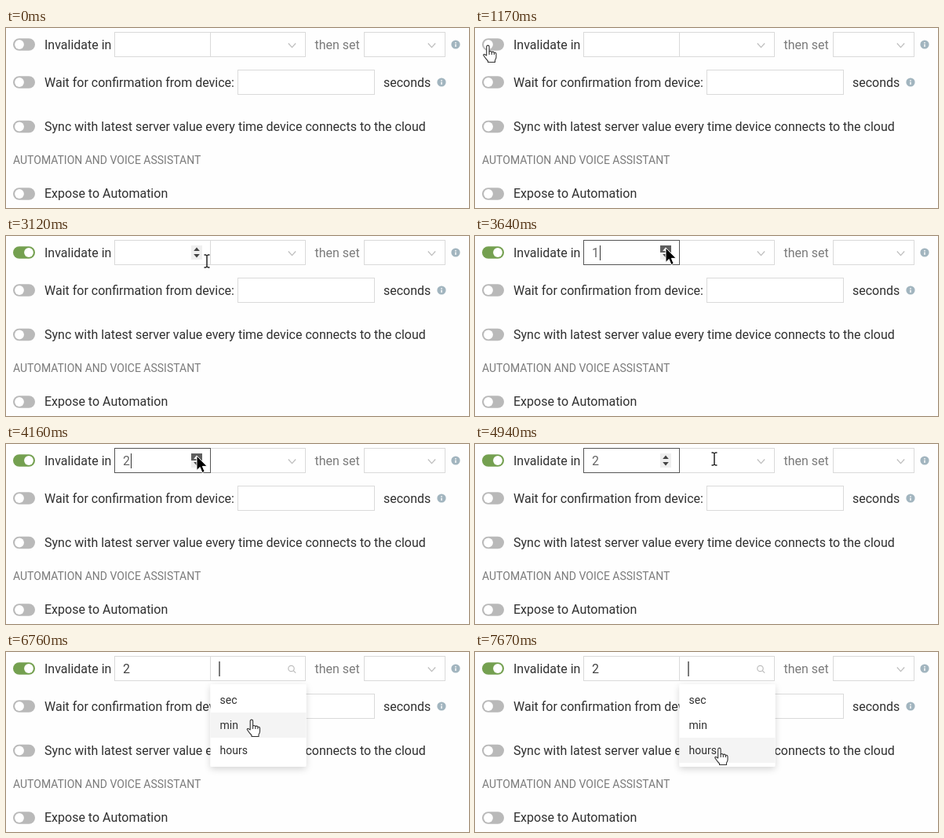
Animation, 590 px wide and 229 px high, one loop 8 s. Source, as an HTML page:

```html
<!DOCTYPE html>
<html lang="en">
<head>
<meta charset="utf-8">
<style>
html, body { margin: 0; width: 100%; height: 100%; overflow: hidden; background: #fefefe; }
svg { display: block; }
text { font: 16px Roboto, Arial, sans-serif; fill: #303030; }
.gray { fill: #7b7b7b; }
.small { font-size: 14px; }
.box { fill: #fff; stroke: #dadada; }
.line { fill: none; stroke: #bdbdbd; stroke-width: 1.2; }
</style>
</head>
<body>
<svg width="590" height="229" viewBox="0 0 590 229">
  <defs>
    <g id="info">
      <circle r="5.6" fill="#a2b5bf"/>
      <path d="M0-3v1.4M0-.6V3" stroke="#fff" stroke-width="1.4"/>
    </g>
    <path id="chevron" class="line" d="M-4.7-2.5L0 2.7L4.7-2.5"/>
    <filter id="shadow" x="-20%" y="-20%" width="140%" height="150%">
      <feDropShadow dx="0" dy="3" stdDeviation="4" flood-opacity=".16"/>
    </filter>
  </defs>

  <g id="toggles"></g>

  <text x="49" y="26.5">Invalidate in</text>
  <text x="49" y="74.5">Wait for confirmation from device:</text>
  <text x="49" y="130.5">Sync with latest server value every time device connects to the cloud</text>
  <text x="9" y="173" class="gray small">AUTOMATION AND VOICE ASSISTANT</text>
  <text x="49" y="216">Expose to Automation</text>
  <text x="393.5" y="26.5" class="gray">then set</text>
  <text x="481" y="74.5">seconds</text>

  <rect class="box" x="260.5" y="5.5" width="121" height="31"/>
  <rect class="box" x="456.5" y="5.5" width="103" height="31"/>
  <rect class="box" x="295.5" y="53.5" width="174" height="31"/>
  <rect class="box" id="field" x="138.5" y="5.5" width="122" height="31"/>
  <text id="value" x="149" y="27"></text>
  <path id="fieldCaret" d="M159.5 12V31" stroke="#333"/>

  <g id="spinner">
    <rect x="236" y="12" width="14" height="18" fill="#efefef"/>
    <rect id="upButton" x="236" y="12" width="14" height="9" fill="#5f5f5f"/>
    <path id="upMark" d="M239.2 19l3.8-4.5 3.8 4.5z"/>
    <path d="M239.2 23l3.8 4.5 3.8-4.5z" fill="#444"/>
  </g>

  <use id="selectMark" href="#chevron" x="364.5" y="22"/>
  <g id="search" class="line"><circle cx="363.5" cy="21" r="3.7"/><path d="M366.2 23.7l3 3"/></g>
  <path id="selectCaret" d="M272 12V31" stroke="#333" stroke-width="1.3"/>
  <use href="#chevron" x="542.5" y="22"/>
  <use href="#info" x="573" y="21"/>
  <use href="#info" x="555" y="69"/>

  <g id="menu">
    <rect x="260.5" y="41" width="122" height="105" rx="2" fill="#fff" filter="url(#shadow)"/>
    <rect id="active" x="260.5" width="122" height="32" fill="#f4f4f4"/>
    <text class="small" x="272.5" y="66">sec</text>
    <text class="small" x="272.5" y="98">min</text>
    <text class="small" x="272.5" y="130">hours</text>
  </g>

  <g id="pointer" stroke-linejoin="round">
    <g id="hand" fill="#fff" stroke="#333" stroke-width="1.1">
      <path d="M-1.8 13V1.8a1.7 1.7 0 0 1 3.4 0V8q1.8-1.3 3.2.6q1.7-1.1 3.1.7q2.3-.5 2.6 1.7V15q0 2-1.5 4V21.5H0V20Q-3 17-5.8 12.5q.6-2.4 4 .5z"/>
      <path d="M1.6 8v4M4.8 8.6V12M7.9 9.3V12" fill="none"/>
    </g>
    <path id="beam" d="M-3.5-8H-1.5L0-7L1.5-8H3.5M0-7V7M-3.5 8H-1.5L0 7L1.5 8H3.5" fill="none" stroke="#222" stroke-width="1.5"/>
    <path id="arrow" d="M0 0V18.5L4.2 14.6L7 21.5L10.2 20.2L7.4 13.4H13.2z" stroke="#fff"/>
  </g>
</svg>
<script>
const $ = id => document.getElementById(id);
const show = (id, on) => $(id).style.display = on ? '' : 'none';
const clamp = v => Math.min(1, Math.max(0, v));
const ease = v => v * v * (3 - 2 * v);

const LOOP = 8000, STEP = 130;
const ENTER = 650, TOGGLE = 1690, FOCUS = 3640, SECOND = 4030, OPEN = 5460;

// Pointer stops: time, x, y
const path = [
  [520, 95, 235], [1170, 16.5, 22], [1820, 16.5, 22], [3120, 256, 32],
  [3510, 243, 15], [4550, 243, 15], [5330, 367, 23], [5980, 367, 23],
  [6760, 313, 86], [6890, 313, 86], [7670, 311.5, 122], [8000, 311.5, 122]
];

$('toggles').innerHTML = [21, 69, 125.5, 211].map(y =>
  `<rect x="9" y="${y - 7.75}" width="28" height="15.5" rx="7.75" fill="#b9b9b9"/>
   <circle cx="17" cy="${y}" r="5.9" fill="#fff"/>`).join('');
const [track, knob] = $('toggles').children;

function position(t) {
  const i = Math.max(1, path.findIndex(p => p[0] > t));
  const [t0, x0, y0] = path[i - 1], [t1, x1, y1] = path[i];
  const k = ease(clamp((t - t0) / (t1 - t0)));
  return [x0 + (x1 - x0) * k, y0 + (y1 - y0) * k];
}

function draw(t) {
  const [x, y] = position(t);
  const inside = (l, top, r, b) => t >= ENTER && x >= l && x <= r && y >= top && y <= b;
  const blink = since => t >= since && (t - since) % 1060 < 530;
  const opened = t >= OPEN, focused = t >= FOCUS && !opened;
  const inField = inside(138, 5, 260, 37);
  const onSpinner = inside(236, 12, 250, 30);

  const on = ease(clamp((t - TOGGLE) / 260));
  const mix = (a, b) => Math.round(a + (b - a) * on);
  track.setAttribute('fill', `rgb(${mix(185, 116)},${mix(185, 160)},${mix(185, 80)})`);
  knob.setAttribute('cx', 17 + 12 * on);

  $('field').style.stroke = focused ? '#555' : '';
  $('value').textContent = t < FOCUS ? '' : t < SECOND ? '1' : '2';
  $('value').style.fill = focused ? '#666' : '#444';
  show('fieldCaret', focused && blink(t < SECOND ? FOCUS : SECOND));
  show('spinner', inField || focused);
  show('upButton', onSpinner);
  $('upMark').setAttribute('fill', onSpinner ? '#fff' : '#444');

  show('selectMark', !opened);
  show('search', opened);
  show('selectCaret', blink(OPEN));

  const grow = clamp((t - OPEN + 65) / 260);
  show('menu', opened);
  $('menu').setAttribute('opacity', grow);
  $('menu').setAttribute('transform', `translate(0 41) scale(1 ${0.8 + 0.2 * grow}) translate(0 -41)`);
  const row = y < 77 ? 0 : y < 109 ? 1 : 2;
  $('active').setAttribute('y', 45 + 32 * row);

  const hand = inside(9, 13, 37, 29) || (opened && inside(261, 41, 382, 146));
  const beam = (inField && !onSpinner) || inside(261, 5, 382, 37);
  show('pointer', t >= ENTER);
  show('hand', hand);
  show('beam', beam && !hand);
  show('arrow', !hand && !beam);
  $('pointer').setAttribute('transform', `translate(${x.toFixed(1)} ${y.toFixed(1)})`);
}

const start = performance.now();
function tick() {
  const t = (performance.now() - start) % LOOP;
  draw(Math.floor(t / STEP) * STEP);
  requestAnimationFrame(tick);
}
tick();
</script>
</body>
</html>
```
